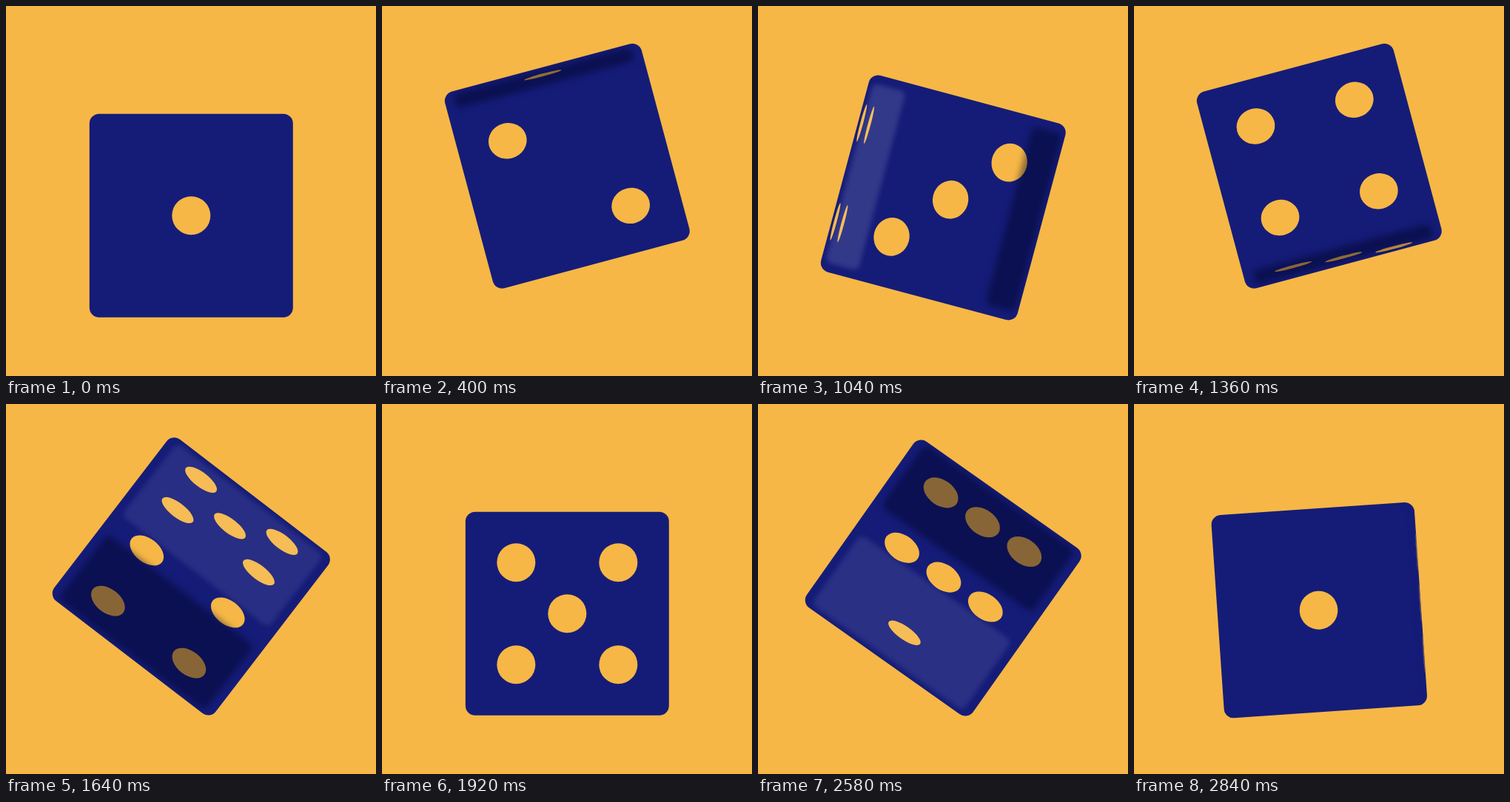
Animation of 500x500 px, one loop 2.86 s. Source, as an HTML page with a canvas:

```html
<!DOCTYPE html>
<html lang="en">
<head>
<meta charset="utf-8">
<title>Rolling die</title>
<style>
  html, body { margin: 0; width: 100%; height: 100%; overflow: hidden; background: #f6b746; }
  canvas { display: block; width: 500px; height: 500px; }
</style>
</head>
<body>
<canvas id="stage" width="500" height="500"></canvas>
<script>
const ctx = document.getElementById('stage').getContext('2d');

const GOLD = '#f6b746', BLUE = '#151c78';
const LOOP = 2860, TICK = 20, ROLL = 480;
const SIZE = 275, HALF = SIZE / 2, CORNER = 13;
const PIP = 26, GAP = 69, LIFT = 67, APEX = 5 / 6;

// Pips of each face as [column, row] in -1..1
const pair = [[1, -1], [-1, 1]];
const four = [...pair, [-1, -1], [1, 1]];
const dot = [0, 0];
const faces = [
  [dot], pair, [...pair, dot], four, [...four, dot], [...four, [-1, 0], [1, 0]]
];

const clamp = v => Math.min(1, Math.max(0, v));
const smooth = p => p * p * (3 - 2 * p);

// Slow climb to the apex, then a quick settling drop
function height(p) {
  const left = p < APEX ? 1 - p / APEX : (1 - p) / (1 - APEX);
  return LIFT * (p < APEX ? 1 - left * left : left * left);
}

function roundBox(x, y, w, h, r) {
  ctx.beginPath();
  ctx.roundRect(x, y, w, h, r);
}

function drawFace(pips, center, scale) {
  if (scale < 0.002) return;
  ctx.fillStyle = GOLD;
  for (const [col, row] of pips) {
    ctx.beginPath();
    ctx.ellipse(center + col * GAP * scale, row * GAP, PIP * scale, PIP, 0, 0, Math.PI * 2);
    ctx.fill();
  }
}

function drawShade(x, w, color, alpha, blur) {
  if (w <= 0 || alpha <= 0) return;
  ctx.save();
  ctx.globalAlpha = alpha;
  ctx.filter = `blur(${blur}px)`;
  ctx.fillStyle = color;
  roundBox(x, -125, w, 250, Math.min(8, w / 2));
  ctx.fill();
  ctx.restore();
}

function draw(time) {
  const step = Math.min(5, Math.floor(time / ROLL));
  const start = step * ROLL;
  const p = (time - start) / (Math.min(start + ROLL, LOOP) - start);
  const turned = smooth(p);
  const exitWidth = SIZE * (1 - turned);

  ctx.fillStyle = GOLD;
  ctx.fillRect(0, 0, 500, 500);

  ctx.save();
  ctx.translate(250.3, 283.2 - height(p));
  ctx.rotate((step + p) * Math.PI / 2);

  ctx.fillStyle = BLUE;
  roundBox(-HALF, -HALF, SIZE, SIZE, CORNER);
  ctx.fill();
  ctx.clip();

  // The old face narrows to the left while the next opens from the right
  drawFace(faces[step], -HALF + exitWidth / 2, 1 - turned);
  drawFace(faces[(step + 1) % 6], -HALF + (SIZE + exitWidth) / 2, turned);

  const dark = Math.min(SIZE * p, exitWidth + 4);
  const light = 310 * p;
  drawShade(-HALF + 4, dark - 4, '#000424', 0.45 * clamp(exitWidth / 12), 4);
  drawShade(HALF - light, light - 6, '#fff', 0.13 * clamp((0.8 - p) / 0.6), 3);
  ctx.restore();
}

const origin = performance.now();
function frame() {
  const elapsed = performance.now() - origin;
  draw(Math.floor((elapsed % LOOP) / TICK) * TICK);
  requestAnimationFrame(frame);
}
frame();
</script>
</body>
</html>
```
